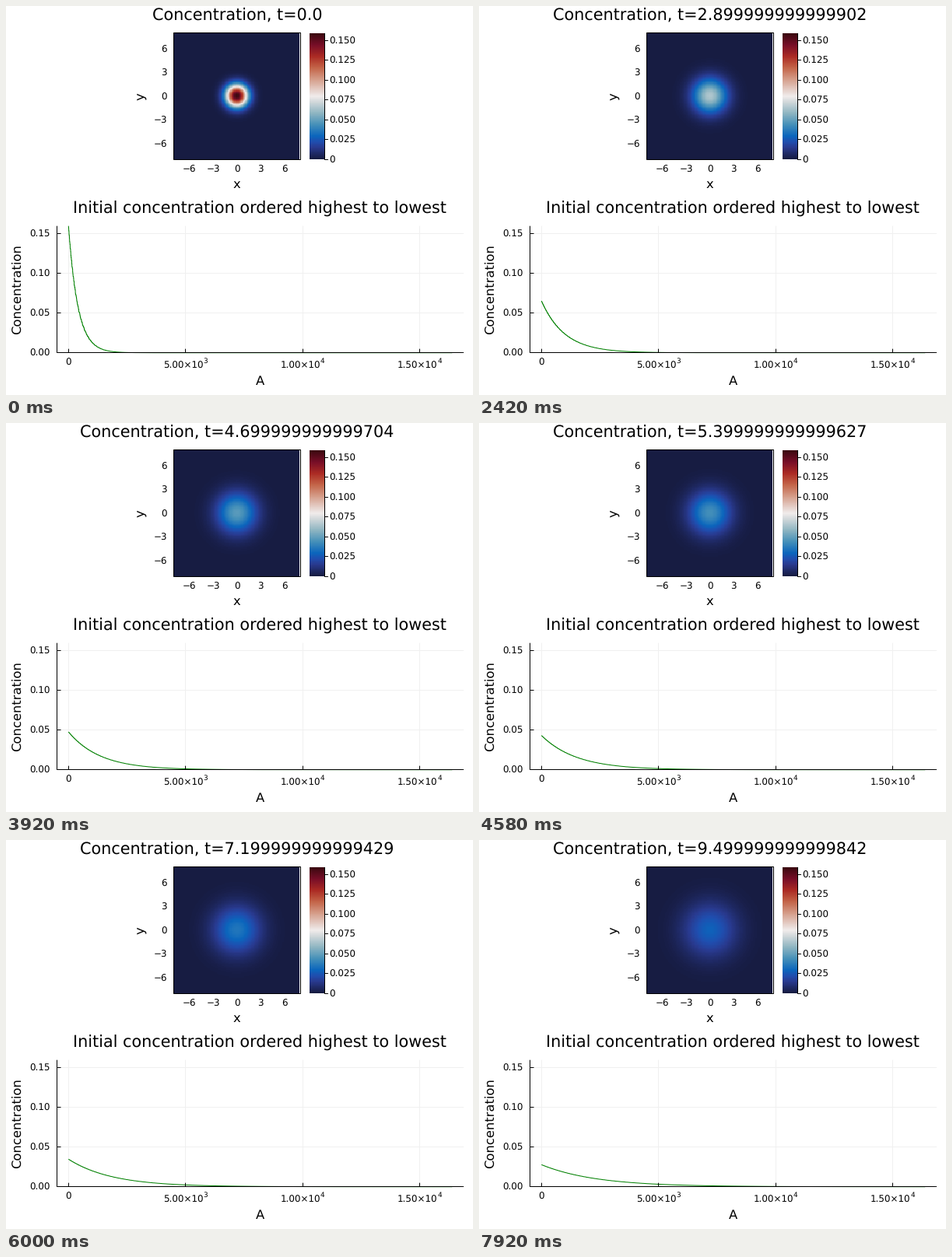
A matplotlib script for the animation above (8000 ms loop, 600 by 500 pixels).

```python
import math

import numpy as np
import matplotlib.pyplot as plt
from matplotlib.animation import FuncAnimation
from matplotlib.colors import LinearSegmentedColormap
from matplotlib.patches import Rectangle

plt.rcParams.update({"font.family": "DejaVu Sans", "text.hinting": "none",
                     "path.snap": False})

W, H, DPI = 600, 500, 100
PT = 72 / DPI                       # points per pixel
TITLE, LABEL, TICK = 20.8, 16.35, 11.9
FRAMES, LOOP = 96, 8000

# physics: spreading Gaussian on a square grid
N, DT, STEPS, D = 128, 0.002, 50, 0.25
PEAK = 1 / (2 * np.pi)
grid = -8 + 16 / N * np.arange(N)
r2 = grid[:, None] ** 2 + grid[None, :] ** 2
r2_sorted = np.sort(r2.ravel())

times = [0.0]
for _ in range(FRAMES - 1):
    t = times[-1]
    for _ in range(STEPS):
        t += DT
    times.append(t)


def conc(dist2, t):
    var = 1 + 2 * D * t
    return PEAK / var * np.exp(-dist2 / (2 * var))


stops = [(0, (23, 28, 66)), (1, (41, 58, 143)), (1.5, (32, 78, 175)),
         (2, (11, 102, 189)), (3, (69, 144, 185)), (4, (142, 181, 194)),
         (5, (210, 216, 219)), (5.5, (241, 236, 235)), (6, (230, 210, 204)),
         (7, (213, 157, 137)), (8, (196, 101, 73)), (9, (172, 43, 36)),
         (10, (120, 14, 40)), (11, (60, 9, 17))]
cmap = LinearSegmentedColormap.from_list(
    "balance", [(p / 11, np.array(c) / 255) for p, c in stops])

# one canvas in pixel coordinates, y pointing down
fig = plt.figure(figsize=(W / DPI, H / DPI), dpi=DPI, facecolor="white")
ax = fig.add_axes([0, 0, 1, 1])


def text(x, y, s, size, ha="center", rot=0):
    return ax.text(x, y, s, fontsize=size * PT, ha=ha, va="baseline",
                   rotation=rot, rotation_mode="anchor", color="black")


def line(xs, ys, color="black", z=3):
    return ax.plot(xs, ys, color=color, lw=PT, zorder=z,
                   solid_capstyle="butt")[0]


def mid(v):
    """Centre of the pixel that holds v, for crisp hairlines."""
    return math.floor(v) + 0.5


def hline(x0, x1, y, **kw):
    return line([x0, x1], [mid(y)] * 2, **kw)


def vline(x, y0, y1, **kw):
    return line([mid(x)] * 2, [y0, y1], **kw)


DROP = TICK * 0.365                 # baseline offset that centres digits

# heatmap
X0, Y0, UNIT = 296.8, 116.3, 10.17
heat = ax.imshow(conc(r2, 0), cmap=cmap, vmin=0, vmax=PEAK, origin="lower",
                 extent=(215, 377, 197, 35), interpolation="nearest",
                 aspect="auto", zorder=1)
ax.add_patch(Rectangle((215.5, 34.5), 163, 163, fill=False, ec="black",
                       lw=PT, zorder=3))
for v in (-6, -3, 0, 3, 6):
    s = str(v).replace("-", "\u2212")
    text(X0 + v * UNIT, 214, s, TICK)
    text(206.8, Y0 - v * UNIT + DROP, s, TICK, ha="right")
text(X0, 233.7, "x", LABEL)
text(178, Y0, "y", LABEL, rot=90)
title = text(X0, 18.2, "", TITLE)

# colour bar
ax.imshow(np.linspace(0, 1, 256)[:, None], cmap=cmap, origin="lower",
          extent=(390, 409, 197, 35), aspect="auto", zorder=1)
vline(409, 35, 198)
for k in range(7):
    v = 0.025 * k
    y = 197.4 - v / PEAK * 162.7
    hline(409, 414, y)
    text(415.3, y + DROP, f"{v:.3f}" if k else "0", TICK, ha="left")

# ordered concentration
LEFT, RIGHT, TOP, BASE = 65.5, 588, 282.7, 445.7
PX = (RIGHT - LEFT) / (1.06 * (N * N - 1))
START = LEFT + 0.03 * (N * N - 1) * PX
PY = (BASE - TOP) / PEAK
GRID = "#f0f0f0"

for k in range(4):
    x = START + 5000 * k * PX
    vline(x, TOP, BASE, color=GRID, z=1)
    vline(x, BASE - 5, BASE)
    y = BASE - 0.05 * k * PY
    hline(LEFT, RIGHT, y, color=GRID, z=1)
    hline(LEFT, LEFT + 5, y)
    text(56.8, y + DROP, f"{0.05 * k:.2f}", TICK, ha="right")
    if k == 0:
        text(x, 461.6, "0", TICK)
        continue
    power = 3 if k == 1 else 4
    left = x - 28.8
    text(left, 465.8, f"{5000 * k / 10 ** power:.2f}\u00d710", TICK, ha="left")
    text(left + 4.336 * TICK, 458.8, str(power), TICK * 0.75, ha="left")
vline(LEFT, TOP, 446)
hline(65, RIGHT, BASE)

text(325.7, 266.2, "Initial concentration ordered highest to lowest", TITLE)
text(326.7, 487, "A", LABEL)
text(18.9, 364.2, "Concentration", LABEL, rot=90)
curve = line(START + PX * np.arange(N * N), np.full(N * N, BASE),
             "#008000", z=2)

ax.set_xlim(0, W)
ax.set_ylim(H, 0)
ax.set_aspect("auto")
ax.axis("off")


def update(i):
    t = times[i]
    heat.set_data(conc(r2, t))
    curve.set_ydata(BASE - PY * conc(r2_sorted, t))
    title.set_text(f"Concentration, t={t}")
    return heat, curve, title


anim = FuncAnimation(fig, update, frames=FRAMES, interval=LOOP / FRAMES,
                     repeat=True, repeat_delay=0)
plt.show()
```
